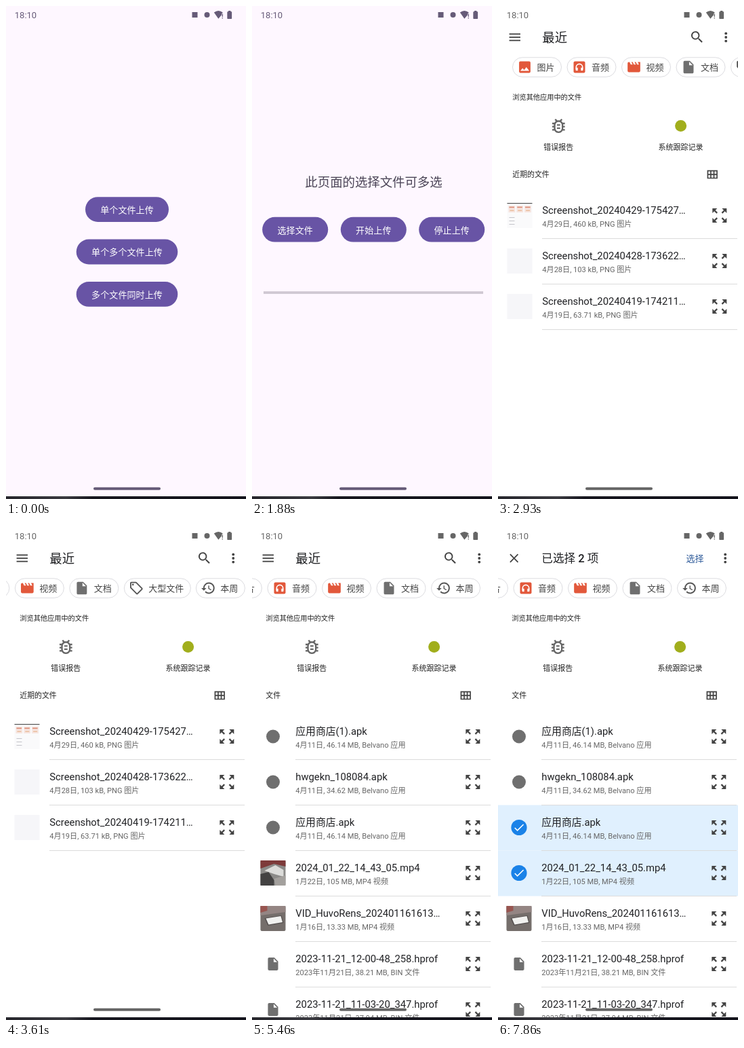
These frames come from a looping animation (354x726 px, 7990 ms). An HTML page:

```html
<!DOCTYPE html>
<html lang="zh-CN">
<head>
<meta charset="utf-8">
<title>文件上传</title>
<style>
html, body { margin: 0; width: 100%; height: 100%; overflow: hidden; background: #fff; }
svg { display: block; width: 354px; height: 726px; }
text { font-family: Roboto, "Noto Sans CJK SC", "Noto Sans CJK", "Noto Sans", sans-serif; white-space: pre; }
</style>
</head>
<body>
<svg id="stage" viewBox="0 0 354 726" xmlns="http://www.w3.org/2000/svg"></svg>
<script>
const LOOP = 7990, TICK = 70, MID = 178.5, SLIDE = 35.5;
const PURPLE = '#6854a5', RED = '#e2583b', GREY = '#6f6f6f', INK = '#444', BLUE = '#1a82e8';

const paths = {
  image: 'M21 19V5c0-1.1-.9-2-2-2H5c-1.1 0-2 .9-2 2v14c0 1.1.9 2 2 2h14c1.1 0 2-.9 2-2zM8.5 13.5l2.5 3L14.5 12l4.5 6H5z',
  movie: 'M18 4l2 4h-3l-2-4h-2l2 4h-3l-2-4H8l2 4H7L5 4H4c-1.1 0-2 .9-2 2v12c0 1.1.9 2 2 2h16c1.1 0 2-.9 2-2V4z',
  file: 'M6 2c-1.1 0-2 .9-2 2v16c0 1.1.9 2 2 2h12c1.1 0 2-.9 2-2V8l-6-6zm7 7V3.5L18.5 9z',
  history: 'M13 3a9 9 0 0 0-9 9H1l4 4 4-4H6a7 7 0 1 1 2.06 4.94l-1.42 1.42A9 9 0 1 0 13 3zm-1 5v5l4.28 2.54.72-1.21-3.5-2.08V8z',
  tag: 'M21.4 11.6l-9-9A2 2 0 0 0 11 2H4a2 2 0 0 0-2 2v7c0 .55.2 1 .6 1.4l9 9a2 2 0 0 0 2.8 0l7-7a2 2 0 0 0 0-2.8zM13 20l-9-9V4h7l9 9zM5 6.5a1.5 1.5 0 1 0 3 0a1.5 1.5 0 1 0-3 0z',
  check: 'M9 16.2L4.8 12l-1.4 1.4L9 19 21 7l-1.4-1.4z',
  search: 'M15.5 14h-.8l-.3-.3A6.5 6.5 0 1 0 13.7 14.4l.3.3v.8l5 5 1.5-1.5zm-6 0a4.5 4.5 0 1 1 0-9a4.5 4.5 0 0 1 0 9z',
  expand: 'M15 3l2.3 2.3-2.9 2.9 1.4 1.4L18.7 6.7 21 9V3zM3 9l2.3-2.3 2.9 2.9 1.4-1.4L6.7 5.3 9 3H3zm6 12l-2.3-2.3 2.9-2.9-1.4-1.4L5.3 17.3 3 15v6zm12-6l-2.3 2.3-2.9-2.9-1.4 1.4 2.9 2.9L15 21h6z',
  bug: 'M20 8h-2.8a6 6 0 0 0-1.8-2L17 4.4 15.6 3l-2.2 2.2a6 6 0 0 0-2.8 0L8.4 3 7 4.4 8.6 6A6 6 0 0 0 6.8 8H4v2h2.1L6 12H4v2h2l.1 2H4v2h2.8a6 6 0 0 0 10.4 0H20v-2h-2.1l.1-2h2v-2h-2l-.1-2H20z',
  close: 'M19 6.4L17.6 5 12 10.6 6.4 5 5 6.4 10.6 12 5 17.6 6.4 19 12 13.4 17.6 19 19 17.6 13.4 12z'
};

const rect = (x, y, w, h, fill, more = '') =>
  `<rect x="${x}" y="${y}" width="${w}" height="${h}" fill="${fill}" ${more}/>`;
const dot = (x, y, r, fill) => `<circle cx="${x}" cy="${y}" r="${r}" fill="${fill}"/>`;
const shape = (d, fill) => `<path d="${d}" fill="${fill}"/>`;
const text = (x, y, size, str, fill = '#222', more = '') =>
  `<text x="${x}" y="${y}" font-size="${size}" fill="${fill}" ${more}>${str}</text>`;
const centered = 'text-anchor="middle"';
const group = (id, body, more = '') => `<g id="${id}" ${more}>${body}</g>`;
const icon = (name, cx, cy, size, fill) => {
  const k = size / 24;
  return `<path transform="translate(${cx - size / 2} ${cy - size / 2}) scale(${k})" fill-rule="evenodd" fill="${fill}" d="${paths[name]}"/>`;
};

function pill(x, y, w, label, ripple) {
  const round = 'rx="18.4"';
  return rect(x, y, w, 36.8, PURPLE, round) +
    (ripple ? rect(x, y, w, 36.8, `url(#${ripple}Ink)`, `${round} id="${ripple}"`) : '') +
    text(x + w / 2, y + 23.7, 13, label, '#fff', centered + ' letter-spacing=".1" font-weight="500"');
}

const inkGrad = (id, cx, cy, color, a) =>
  `<radialGradient id="${id}" gradientUnits="userSpaceOnUse" cx="${cx}" cy="${cy}" r="10">
    <stop offset="0" stop-color="${color}" stop-opacity="${a}"/>
    <stop offset=".45" stop-color="${color}" stop-opacity="${a * 0.9}"/>
    <stop offset="1" stop-color="${color}" stop-opacity="0"/></radialGradient>`;

const home = rect(-60, 0, 474, 726, '#fef7ff') +
  pill(117, 281.2, 123, '单个文件上传') +
  pill(103.7, 343.6, 149.6, '单个多个文件上传') +
  pill(103.7, 406, 149.6, '多个文件同时上传', 'homeTap');

const upload = rect(-60, 0, 474, 726, '#fef7ff') +
  text(MID, 265.5, 18.4, '此页面的选择文件可多选', '#4a4456', centered) +
  pill(14.2, 310.8, 97, '选择文件', 'pickTap') +
  pill(129.8, 310.8, 97, '开始上传') +
  pill(245.2, 310.8, 97, '停止上传') +
  rect(16, 420.2, 324, 3.7, '#cfc7d2');

// Chips: id, start x, width, label, icon, icon colour
const chips = [
  ['pic', 20, 73, '图片', 'image', RED],
  ['audio', 100.5, 73, '音频', null, RED],
  ['video', 181, 73, '视频', 'movie', RED],
  ['doc', 261.5, 73, '文档', 'file', GREY],
  ['week', 448, 73, '本周', 'history', '#555'],
  ['big', 342, 99, '大型文件', 'tag', '#555']
];
const BIG_W = 106, BIG_TRAVEL = 322, MAX_SCROLL = 184;

const headphones = rect(10, 81.5, 17, 17, RED, 'rx="2"') +
  '<path d="M13.8 93.5v-3.4a4.7 4.7 0 0 1 9.4 0v3.4" fill="none" stroke="#fff" stroke-width="1.6"/>' +
  rect(13.2, 90.8, 3, 4.4, '#fff') + rect(20.8, 90.8, 3, 4.4, '#fff');

function chip([id, , w, label, art, color]) {
  const frame = (fill, line) => rect(.5, 75.8, w - 1, 28.6, fill, `rx="14.3" stroke="${line}"`);
  const mark = art ? icon(art, 18.5, 90, 22.4, color) : headphones;
  const plain = frame('#fff', '#dcdce0') + mark + text(36.5, 94.8, 13, label, '#444');
  if (id !== 'big') return group(id, plain);
  const picked = frame('#e0f0fd', '#d5e8f8') + icon('check', 18.5, 90, 22, '#3a8ee0') +
    text(36.5, 94.8, 13, label, '#3487dc');
  return group(id, group('bigOff', plain + rect(0, 75.3, w, 29.6, '#000', 'rx="14.8" id="bigTap"')) + group('bigOn', picked));
}

const rowY = i => 308.5 + 67 * i;

function row(i, title, sub, art) {
  const y = rowY(i);
  return art + text(64.3, y - 3, 14.8, title, '#202124') + text(64.3, y + 16.8, 11.1, sub, '#666') +
    icon('expand', 325.8, y, 28, INK) + rect(64, y + 33.5, 288, 1, '#dcdcdc');
}

const blank = i => rect(12.5, rowY(i) - 18.5, 37, 37, '#f6f6f9');
const appMark = i => dot(31, rowY(i), 10, GREY);
const fileMark = i => icon('file', 31, rowY(i), 22.6, GREY);

let shot = rect(12.5, 290, 37, 37, '#fafafb') + rect(12.5, 290, 37, 1.2, '#555');
for (let i = 0; i < 3; i++) {
  const x = 14.5 + i * 11.8;
  shot += rect(x, 294, 9.8, 10, '#f6e6e1') + rect(x + 1, 295.5, 7.5, 1.8, '#dc8f7a') +
    rect(x + 2, 300.5, 6, 1.2, '#e8b48c') + rect(15.5, 311 + i * 5, 8, 1, '#c4c4ca');
}

const photo = (id, y, body) => group(id, body, `transform="translate(12.5 ${y})"`);
const photos = group('photos',
  photo('photo3', 491, rect(0, 0, 37, 37, '#8b8a88', 'rx="2"') +
    shape('M0 0H37V9L20 5L0 12z', '#7d3a3a') + shape('M6 15L22 7L34 14V24L20 20z', '#dcdcda') +
    shape('M0 20L12 17L20 29V37H0z', '#434242') + shape('M20 27L37 22V37H22z', '#a3a09d')) +
  photo('photo4', 558, rect(0, 0, 37, 37, '#756e6b', 'rx="2"') +
    shape('M0 0H37V9L0 14z', '#948583') + shape('M0 0H10V7L0 10z', '#985550') +
    shape('M6 18L31 14L34 25L11 29z', '#55504f') + shape('M8 18.5L30 15L32.5 24L12 27.5z', '#f1f1ef')));

const PNG = 'PNG 图片', APP = 'Belvano 应用';
const recent = text(20.3, 252, 10.9, '近期的文件') +
  row(0, 'Screenshot_20240429-175427…', '4月29日, 460 kB, ' + PNG, shot) +
  row(1, 'Screenshot_20240428-173622…', '4月28日, 103 kB, ' + PNG, blank(1)) +
  row(2, 'Screenshot_20240419-174211…', '4月19日, 63.71 kB, ' + PNG, blank(2));

const tick = i => group('tick' + i, dot(31, rowY(i), 11.6, BLUE) + icon('check', 31, rowY(i), 19, '#fff'));
const band = (id, i, fill) => rect(0, rowY(i) - 33, 354, 67, fill, `id="${id}"`);

const files = band('sel2', 2, '#e0f0fe') + band('sel3', 3, '#e0f0fe') +
  band('press2', 2, 'url(#press2Ink)') + band('press3', 3, 'url(#press3Ink)') +
  text(20.3, 252, 10.9, '文件') +
  row(0, '应用商店(1).apk', '4月11日, 46.14 MB, ' + APP, appMark(0)) +
  row(1, 'hwgekn_108084.apk', '4月11日, 34.62 MB, ' + APP, appMark(1)) +
  row(2, '应用商店.apk', '4月11日, 46.14 MB, ' + APP, group('mark2', appMark(2))) +
  row(3, '2024_01_22_14_43_05.mp4', '1月22日, 105 MB, MP4 视频', '') +
  row(4, 'VID_HuvoRens_202401161613…', '1月16日, 13.33 MB, MP4 视频', '') +
  row(5, '2023-11-21_12-00-48_258.hprof', '2023年11月21日, 38.21 MB, BIN 文件', fileMark(5)) +
  row(6, '2023-11-21_11-03-20_347.hprof', '2023年11月21日, 37.94 MB, BIN 文件', fileMark(6)) +
  photos + tick(2) + tick(3);

const browseBar = [41.3, 46, 50.7].map(y => rect(15.6, y - .9, 16.4, 1.8, INK)).join('') +
  text(64.3, 53, 18.4, '最近', '#202124') + icon('search', 292.6, 45.8, 23, INK);
const selectBar = icon('close', 23.7, 46, 22, INK) +
  `<text id="count" x="64.3" y="52.2" font-size="16.6" font-weight="500" fill="#202124"></text>` +
  text(277.5, 51, 13, '选择', '#2f5b9a', 'font-weight="500"');

const bugArt = icon('bug', 88.3, 176.5, 28, '#666') + rect(83.7, 170.7, 9.3, 14, '#fff', 'rx="4.6"') +
  rect(85.9, 174.2, 4.8, 2.1, '#666') + rect(85.9, 178.9, 4.8, 2.1, '#666');
const gridArt = '<path d="M308.4 242.7h13.6v10.8h-13.6zM308.4 248.1h13.6M312.9 242.7v10.8M317.5 242.7v10.8" fill="none" stroke="#444" stroke-width="1.7"/>';

const picker = rect(-60, 0, 474, 726, '#fff') +
  group('browseBar', browseBar) + group('selectBar', selectBar) +
  [40.4, 46, 51.6].map(y => dot(335.2, y, 1.9, INK)).join('') +
  chips.map(chip).join('') +
  text(20.3, 137.8, 10.2, '浏览其他应用中的文件') +
  bugArt + text(88.3, 212, 11, '错误报告', '#222', centered) +
  dot(268.6, 176.5, 8.5, '#a1ae1c') + text(268.6, 212, 11, '系统跟踪记录', '#222', centered) +
  group('recent', recent) + group('files', files) + gridArt;

const status = text(12.8, 18, 13, '18:10', 'currentColor') +
  rect(274.5, 9, 8, 8, 'currentColor') + dot(296.5, 13, 4, 'currentColor') +
  shape('M306.8 9.6Q313.3 4.6 319.8 9.6L318 11.7V13.2L313.3 18.8z', 'currentColor') +
  rect(318.6, 11.5, 1.3, 4.4, 'currentColor') + rect(318.6, 17, 1.3, 1.4, 'currentColor') +
  rect(328, 7, 3.4, 2, 'currentColor') + rect(326.3, 8.2, 6.8, 10.8, 'currentColor', 'rx=".8"') +
  rect(129, 708.8, 99, 4, 'currentColor', 'rx="2"');

document.getElementById('stage').innerHTML =
  '<defs>' + inkGrad('homeTapInk', 215, 425, '#fff', .22) + inkGrad('pickTapInk', 64, 330, '#fff', .22) +
  inkGrad('press2Ink', 98, 443, '#000', .27) + inkGrad('press3Ink', 98, 510, '#000', .2) +
  '<linearGradient id="edge"><stop offset="0" stop-color="#26262c"/><stop offset=".25" stop-color="#3a3a40"/>' +
  '<stop offset=".36" stop-color="#17171f"/><stop offset="1" stop-color="#14141c"/></linearGradient></defs>' +
  group('home', home) + group('upload', upload) + group('picker', picker) + group('status', status) +
  rect(0, 722, 354, 4, 'url(#edge)');

const el = id => document.getElementById(id);
const clamp = v => Math.min(1, Math.max(0, v));
const span = (t, start, length) => clamp((t - start) / length);
const show = (id, on) => el(id).style.opacity = +on;
const shift = (id, x) => el(id).setAttribute('transform', `translate(${x.toFixed(2)} 0)`);

// Motion is held between ticks inside these spans.
const spans = [[1460, 2020], [2440, 3070], [3400, 4110], [4510, 4650], [4780, 5060], [5390, 5460], [7010, 7790], [7860, 7860]];
function hold(t) {
  let out = 0;
  for (const [a, b] of spans) if (t >= a) out = Math.min(b, a + Math.floor((t - a) / TICK) * TICK);
  return out;
}

// Two joined Bezier curves: quick start, very slow finish.
const curves = [[0, 0, .05, 0, .1333, .06, .1667, .4], [.1667, .4, .2083, .82, .25, 1, 1, 1]];
const bez = (a, b, c, d, s) => a * (1 - s) ** 3 + 3 * b * s * (1 - s) ** 2 + 3 * c * s * s * (1 - s) + d * s ** 3;
function glide(p) {
  const [x0, y0, x1, y1, x2, y2, x3, y3] = curves[p < .1667 ? 0 : 1];
  let lo = 0, hi = 1;
  for (let i = 0; i < 24; i++) {
    const m = (lo + hi) / 2;
    if (bez(x0, x1, x2, x3, m) < p) lo = m; else hi = m;
  }
  return bez(y0, y1, y2, y3, lo);
}

// Pages slide by whole pixels.
function openPage(t, start, from, to) {
  const p = glide(span(t, start, 450));
  shift(from, Math.round(-SLIDE * p));
  shift(to, Math.round(SLIDE * (1 - p)));
  show(to, span(t, start + 50, 83));
}

function ripple(id, t, start, end, r0, speed) {
  show(id, t >= start ? 1 - span(t, end, 140) : 0);
  el(id + 'Ink').setAttribute('r', r0 + Math.max(0, t - start) * speed);
}

function draw(t) {
  if (t < 2440) openPage(t, 1620, 'home', 'upload');
  else show('upload', 1);
  if (t >= 2440) openPage(t, 2680, 'upload', 'picker');
  else show('picker', 0);
  ripple('homeTap', t, 1460, 1900, 30, .8);
  ripple('pickTap', t, 2440, 2700, 25, .6);
  el('status').style.color = t < 2760 ? '#665b78' : '#666';

  const scroll = t < 3400 ? 0 : MAX_SCROLL * (1 - Math.exp(-(t - 3360) / 102));
  const move = (1 - Math.cos(Math.PI * span(t, 4603, 300))) / 2;
  for (const [id, x] of chips) {
    const push = id === 'week' ? 0 : id === 'big' ? -BIG_TRAVEL : BIG_W;
    shift(id, x - scroll + push * move);
  }
  show('bigOn', t >= 4580);
  show('bigOff', t < 4580);
  el('bigTap').style.opacity = t >= 4510 ? .08 : 0;

  show('recent', t < 5390);
  show('files', t >= 5390);
  show('photos', t >= 5460);

  const first = t >= 7430, second = t >= 7710;
  ripple('press2', t, 7010, 7430, 108, 1.7);
  ripple('press3', t, 7640, 7710, 90, 1.7);
  show('sel2', first);
  show('sel3', second);
  show('photo3', !second);
  show('mark2', !first);
  show('tick2', first);
  show('tick3', span(t, 7640, 200));
  show('browseBar', !first);
  show('selectBar', first);
  el('count').textContent = `已选择 ${second ? 2 : 1} 项`;
}

function frame() {
  draw(hold(performance.now() % LOOP));
  requestAnimationFrame(frame);
}
frame();
</script>
</body>
</html>
```
